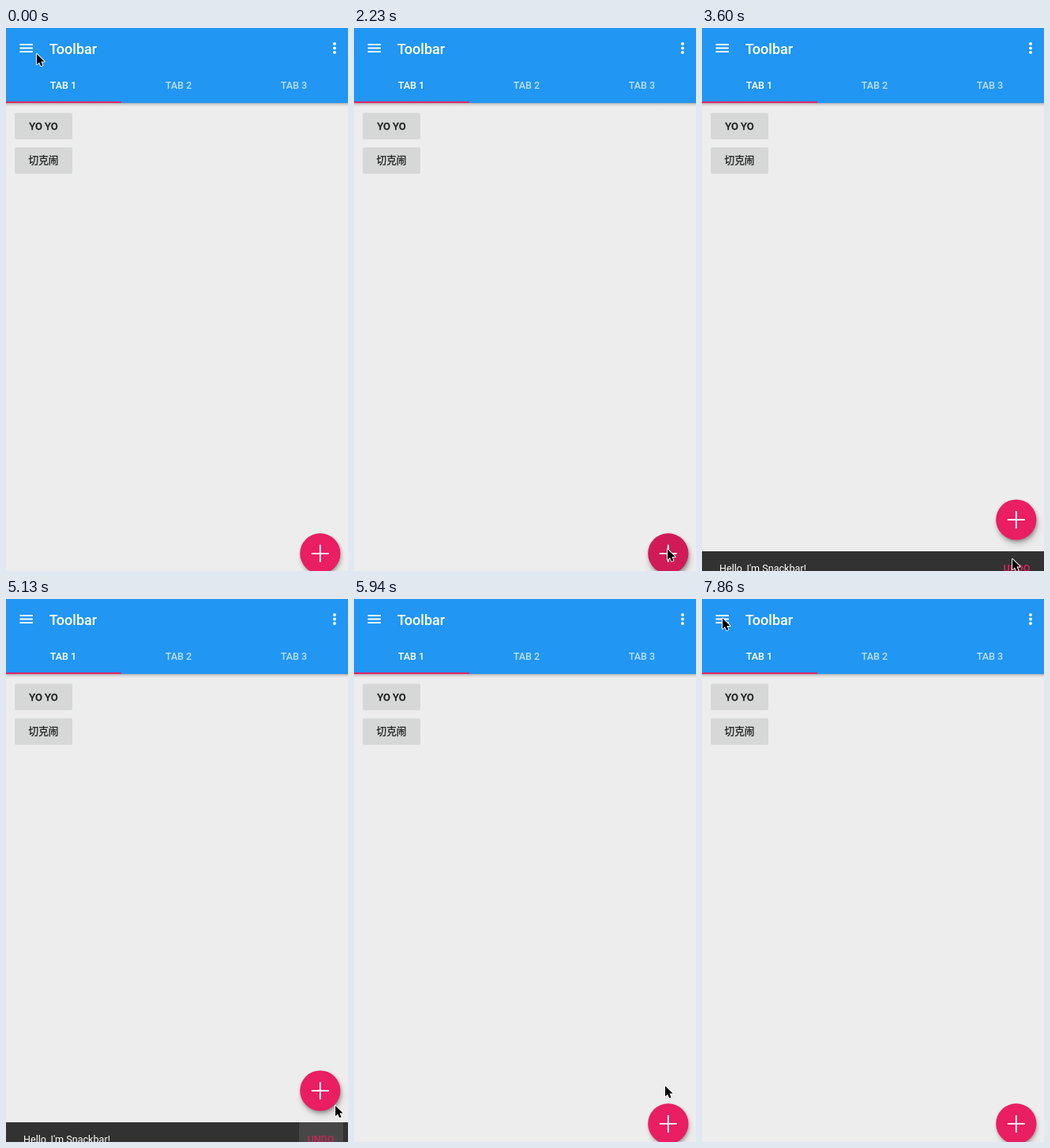
Recreate the animation shown at these times as an HTML page. Size 433 px wide and 688 px high, loop 8 s.

```html
<!DOCTYPE html>
<html lang="en">
<head>
<meta charset="utf-8">
<title>Toolbar demo</title>
<style>
  html, body { margin: 0; width: 100%; height: 100%; overflow: hidden; background: #ededed; }
  svg { display: block; width: 100%; height: 100%; }
  text { font: 500 12.6px Roboto, "Noto Sans CJK SC", "Noto Sans CJK", sans-serif; }
  .mid { text-anchor: middle; }
</style>
</head>
<body>
<svg viewBox="0 0 433 688">
  <defs>
    <linearGradient id="fade" x2="0" y2="1">
      <stop stop-color="#000" stop-opacity=".27"/>
      <stop offset=".4" stop-color="#000" stop-opacity=".1"/>
      <stop offset="1" stop-color="#000" stop-opacity="0"/>
    </linearGradient>
    <filter id="soft" x="-50%" y="-50%" width="200%" height="200%"><feGaussianBlur stdDeviation="2"/></filter>
    <filter id="softer" x="-50%" y="-50%" width="200%" height="200%"><feGaussianBlur stdDeviation="4"/></filter>
  </defs>
  <rect width="433" height="688" fill="#ededed"/>

  <rect y="95" width="433" height="5" fill="url(#fade)"/>
  <rect width="433" height="95" fill="#2196f3"/>
  <rect y="93.1" width="146" height="1.9" fill="#e91e63"/>
  <path d="M17.5 21h16.4M17.5 25.5h16.4M17.5 30h16.4" stroke="#fff" stroke-width="1.8"/>
  <path d="M416 20v0M416 25.5v0M416 31v0" stroke="#fff" stroke-width="3.8" stroke-linecap="round"/>
  <g fill="#fff">
    <text x="54.7" y="32.6" style="font-size:18px">Toolbar</text>
    <text class="mid" x="72.5" y="77">TAB 1</text>
    <text class="mid" x="218.5" y="77" opacity=".7">TAB 2</text>
    <text class="mid" x="364.5" y="77" opacity=".7">TAB 3</text>
  </g>

  <g fill="#d6d7d7">
    <rect x="11" y="107.5" width="73" height="33.5" rx="2"/>
    <rect x="11" y="151.3" width="73" height="33.5" rx="2"/>
  </g>
  <g fill="#202020" stroke="#202020" stroke-width=".3">
    <text class="mid" x="47.5" y="128.5" style="font-size:13px">YO YO</text>
    <text class="mid" x="47.5" y="172.2" lang="zh-CN">切克闹</text>
  </g>

  <g id="snack">
    <rect width="433" height="44" fill="#323232"/>
    <rect id="hit" x="371" width="56" height="44" fill="#fff"/>
    <text id="msg" x="22" y="26.4" fill="#fff" style="font-weight:400">Hello, I'm Snackbar!</text>
    <text id="undo" class="mid" x="398.5" y="26.4" fill="#e91e63">UNDO</text>
  </g>

  <g id="fab">
    <circle cx="1" cy="2.5" r="25.3" opacity=".3" filter="url(#soft)"/>
    <circle id="lift" cx="2" cy="6" r="25.3" filter="url(#softer)"/>
    <circle r="25.6" fill="#e91e63"/>
    <circle id="press" r="25.6"/>
    <path d="M-11 0H11M0-11V11" stroke="#fff" stroke-width="1.8"/>
  </g>

  <path id="cursor" d="M0 0V13.2L3 10.4L5.2 15.2L7.5 14.2L5.4 9.5H9.6Z" stroke="#fff" stroke-width="1.8" stroke-linejoin="round" paint-order="stroke"/>
</svg>
<script>
const LOOP = 8000, STEP = 142, BAR = 43, BAR_TOP = 663;
const $ = id => document.getElementById(id);
const ramp = (t, start, length) => Math.max(0, Math.min(1, (t - start) / length));
const mix = (a, b, p) => a + (b - a) * p;
const smooth = p => p * p * (3 - 2 * p);

// Material standard curve: cubic-bezier(.4, 0, .2, 1)
function standard(x) {
  let u = x;
  for (let lo = 0, hi = 1, i = 0; i < 18; i++) {
    u = (lo + hi) / 2;
    if (1.2 * (1 - u) ** 2 * u + .6 * (1 - u) * u * u + u ** 3 < x) lo = u;
    else hi = u;
  }
  return u * u * (3 - 2 * u);
}

// Pointer visits: arrival time, x, y
const visits = [
  [0, 39, 33], [284, 26, 26.5], [1278, 397, 660.5], [2500, 397, 660.5],
  [2840, 417, 612], [3540, 393, 673], [4980, 396, 675], [5112, 417, 642],
  [5500, 404, 577], [5820, 394, 617], [6200, 397, 653], [7100, 100, 178], [7800, 26, 24.5]
];
function pointer(t) {
  const next = visits.findIndex(v => v[0] > t);
  if (next < 0) return visits.at(-1).slice(1);
  const [t0, x0, y0] = visits[next - 1], [t1, x1, y1] = visits[next];
  const p = smooth(ramp(t, t0, t1 - t0));
  return [mix(x0, x1, p), mix(y0, y1, p)];
}

function draw(time) {
  const t = Math.floor((time + 10) / STEP) * STEP;
  const shown = standard(ramp(t, 2669, 250)) - standard(ramp(t, 5300, 250));
  const text = ramp(t, 2735, 180) - ramp(t, 5300, 180);
  const held = time < 4980 ? 0 : 1 - ramp(t, 5150, 250);
  const press = time < 2230 ? 0 : 1 - ramp(t, 2450, 500);
  const rest = t < 5300 ? 665.8 : 664.9;

  $('snack').setAttribute('transform', `translate(0 ${BAR_TOP + BAR * (1 - shown)})`);
  $('msg').setAttribute('opacity', text);
  $('undo').setAttribute('opacity', text * (1 - .2 * held));
  $('hit').setAttribute('opacity', .1 * held);
  $('fab').setAttribute('transform', `translate(397.8 ${mix(rest, 623, shown)})`);
  $('press').setAttribute('opacity', .11 * press);
  $('lift').setAttribute('opacity', .08 + .14 * Math.max(press, shown * .6));
  $('cursor').setAttribute('transform', `translate(${pointer(t)})`);
}

const start = performance.now();
function frame() {
  draw((performance.now() - start) % LOOP);
  requestAnimationFrame(frame);
}
frame();
</script>
</body>
</html>
```
